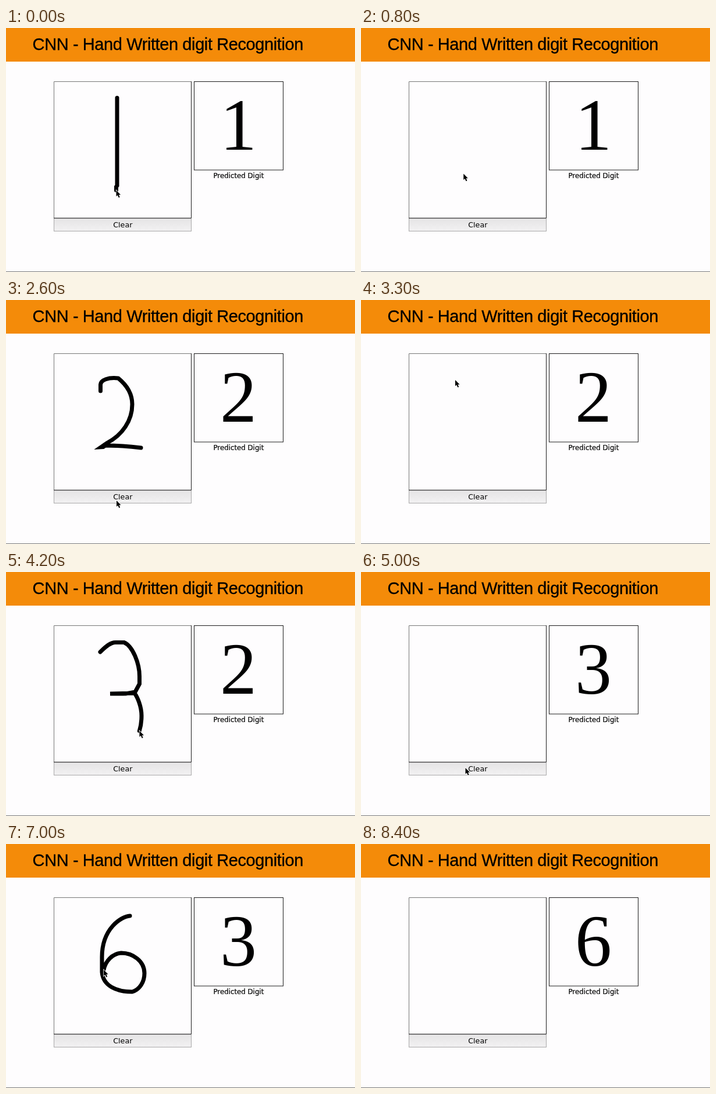
Write an HTML page that moves like this. It is 600 by 421 pixels and loops after 8500 ms.

```html
<!DOCTYPE html>
<html lang="en">
<head>
<meta charset="utf-8">
<title>Digit recognition</title>
<style>
  html, body { margin: 0; width: 100%; height: 100%; overflow: hidden; background: #fefdfe; }
  svg { display: block; width: 600px; height: 421px; }
  .title { font: 29px "Liberation Sans", Arial, sans-serif; letter-spacing: -0.4px; stroke: #000; stroke-width: 0.3; }
  .label { font: 11.8px "DejaVu Sans", Verdana, sans-serif; stroke: #000; stroke-width: 0.2; }
  .button { font: 12.7px "DejaVu Sans", Verdana, sans-serif; }
  .digit { font: 126px "Liberation Serif", "Times New Roman", serif; text-anchor: middle; }
  #ink { fill: none; stroke: #000; stroke-width: 7; stroke-linecap: round; }
</style>
</head>
<body>
<svg viewBox="0 0 600 421">
  <defs>
    <linearGradient id="face" x2="0" y2="1">
      <stop offset="0" stop-color="#e5e4e5"/>
      <stop offset="1" stop-color="#f2f1f2"/>
    </linearGradient>
  </defs>
  <rect width="600" height="58" fill="#f48b09"/>
  <text class="title" x="45.6" y="38.3">CNN - Hand Written digit Recognition</text>

  <rect x="82.5" y="328.5" width="236" height="22" fill="url(#face)" stroke="#a9a8a9"/>
  <path d="M82.5 328V92.5H319" fill="none" stroke="#777"/>
  <path d="M318.5 92V328H82" fill="none" stroke="#1c1c1c"/>
  <text class="button" x="184.2" y="344">Clear</text>

  <rect x="323.5" y="92.5" width="153" height="152.5" fill="none" stroke="#1c1c1c"/>
  <text class="digit" id="guess" x="399.5" y="210">1</text>
  <text class="label" x="356.4" y="258.6">Predicted Digit</text>
  <rect y="420" width="600" height="1" fill="#777"/>

  <path id="ink"/>
  <path id="cursor" d="M0 0V10.6L2.4 8.4L4.3 12.8L6.2 12L4.4 7.7H7.6Z" stroke="#fff" stroke-width="1.4" paint-order="stroke"/>
</svg>
<script>
const LOOP = 8500, STEP = 100;

// Each digit is drawn from `from` to `to`; `rest` is where the cursor waits on the button
const scenes = [
  { digit: 1, from: -900, to: -100, clear: 500, rest: [190, 346],
    d: "M191 120.5V272L189.5 274V280" },
  { digit: 2, from: 900, to: 2200, clear: 2700, rest: [190, 346],
    d: `M162.5 157V146C163 138 176 133 193 135C209 148 217 164 217 180
        C217 208 200 233 174 246.5L163.5 253.8L167 253.6L171 251Q200 251 232 255` },
  { digit: 3, from: 3300, to: 4440, clear: 5000, rest: [179.5, 338],
    d: `M162 138C172 128 180 121.5 188 121.5H203C218 128 229.5 158 229.5 180V193L222 207
        L206 210H179L221 209C226 216 233 232 233 248C233 262 231 270 228 278C222 288 180 290 162 264` },
  { digit: 6, from: 5800, to: 7000, clear: 7800, rest: [195, 336],
    d: `M213 124C198 125 165 146 165 195V221C167 245 190 255 217 255
        C230 251 238 238 238 223C238 202 218 188 198 188C183 189 171 202 168 217` }
];

const byId = id => document.getElementById(id);
const ink = byId("ink"), cursor = byId("cursor"), guess = byId("guess");

const progress = (t, start, end) => Math.min(1, Math.max(0, (t - start) / (end - start)));
const ease = k => k * k * (3 - 2 * k);
const mix = (a, b, k) => a.map((v, i) => v + (b[i] - v) * k);
const startOf = scene => scene.d.match(/[\d.]+/g).slice(0, 2).map(Number);

function cursorAt(t, scene, next, pen) {
  const press = scene.to + 400, leave = scene.clear + 200;
  if (t < press) return mix(pen, scene.rest, ease(progress(t, scene.to + 200, press)));
  if (next) return mix(scene.rest, startOf(next), ease(progress(t, leave, next.from)));
  return t < leave ? scene.rest : null;
}

function draw(t) {
  const scene = scenes.findLast(s => s.from <= t);
  const next = scenes[scenes.indexOf(scene) + 1];

  ink.setAttribute("d", scene.d);
  const total = ink.getTotalLength();
  const drawn = total * progress(t, scene.from, scene.to);
  ink.setAttribute("stroke-dasharray", `${drawn} ${total + 10}`);
  ink.style.display = drawn > 0 && t < scene.clear ? "" : "none";

  const pen = ink.getPointAtLength(drawn);
  const tip = cursorAt(t, scene, next, [pen.x, pen.y]);
  cursor.style.display = tip ? "" : "none";
  if (tip) cursor.setAttribute("transform", `translate(${tip})`);

  guess.textContent = scenes.findLast(s => s.to + 100 <= t).digit;
}

function tick() {
  const t = performance.now() % LOOP;
  draw(Math.floor(t / STEP) * STEP);
  requestAnimationFrame(tick);
}
tick();
</script>
</body>
</html>
```
